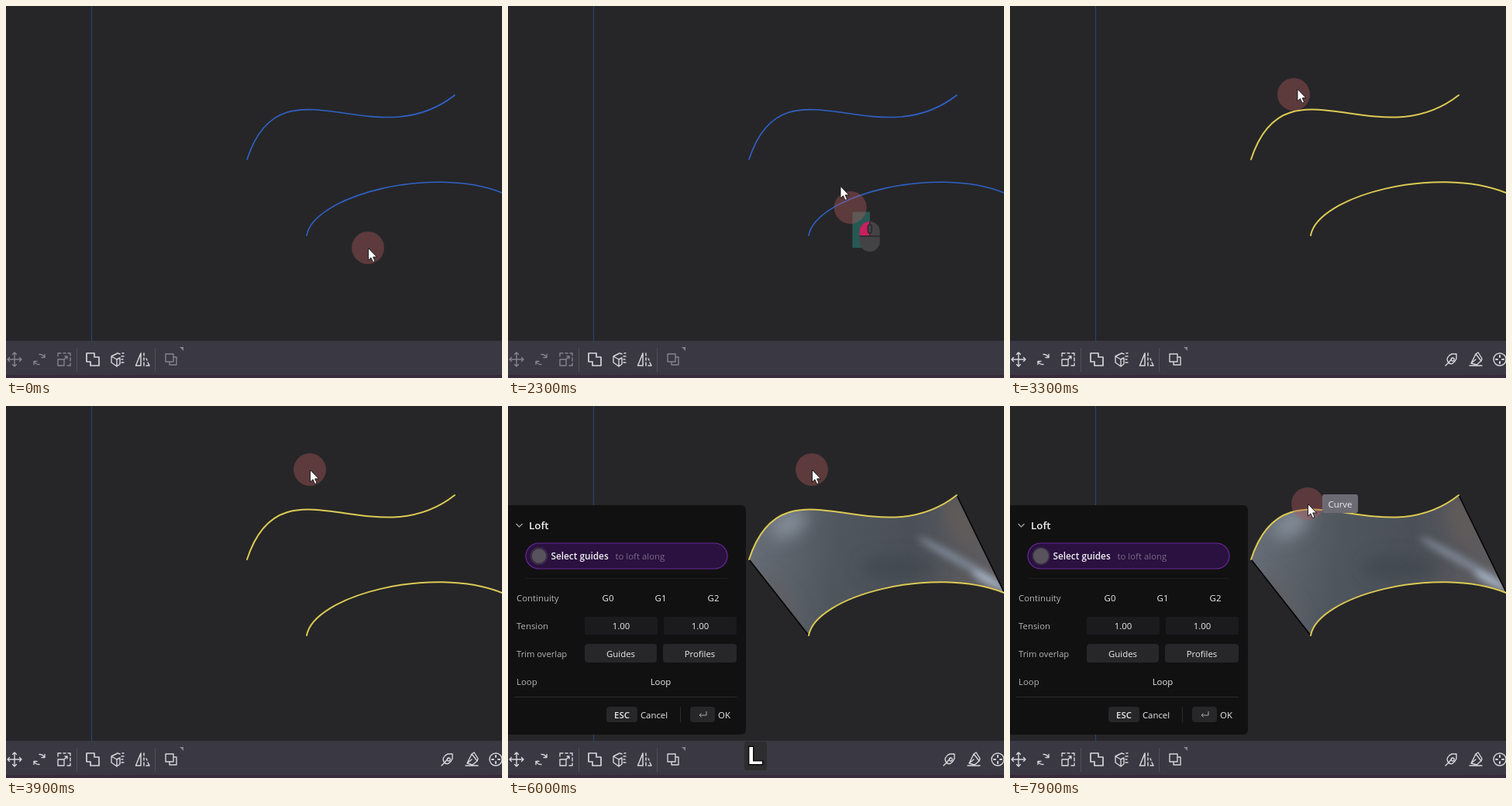
These frames come from a looping animation (640 px wide and 480 px high, 8000 ms). An HTML page:

```html
<!DOCTYPE html>
<html lang="en">
<head>
<meta charset="utf-8">
<title>Loft between two curves</title>
<style>
  html, body { margin: 0; width: 100%; height: 100%; overflow: hidden; background: #262628; }
  svg { display: block; }
  text { font: 11.4px "Open Sans", "Noto Sans", sans-serif; fill: #b4b4b6; }
  .mid text, text.mid { text-anchor: middle; fill: #ececee; }
  .strong { font-weight: 600; fill: #f0f0f2; }
  .key { font: bold 32px "Liberation Sans", Arial, sans-serif; fill: #fff;
         stroke: #0c0c0c; stroke-width: 3; paint-order: stroke; text-anchor: middle; }
  .icons { fill: none; stroke: #d6d5da; stroke-width: 1.4; stroke-linejoin: round; stroke-linecap: round; }
  .curve { fill: none; stroke-linecap: round; }
</style>
</head>
<body>
<svg width="640" height="480" viewBox="0 0 640 480">
  <defs>
    <clipPath id="patch">
      <path d="M311 198C355 62 475 197 579 115L640 241C550 205 397 245 388 296Z"/>
    </clipPath>
    <linearGradient id="base" gradientUnits="userSpaceOnUse" x1="320" y1="160" x2="620" y2="210">
      <stop offset="0" stop-color="#666d76"/>
      <stop offset=".35" stop-color="#50565e"/>
      <stop offset=".65" stop-color="#4b5058"/>
      <stop offset="1" stop-color="#5f5d60"/>
    </linearGradient>
    <filter id="soft" x="-100%" y="-100%" width="300%" height="300%"><feGaussianBlur stdDeviation="10"/></filter>
    <filter id="fine" x="-100%" y="-100%" width="300%" height="300%"><feGaussianBlur stdDeviation="5"/></filter>
  </defs>

  <path d="M110.5 0V432" stroke="#294375" stroke-width="1.2"/>
  <rect id="box" fill="#285853"/>

  <g id="surface">
    <g clip-path="url(#patch)">
      <rect x="300" y="100" width="340" height="200" fill="url(#base)"/>
      <g filter="url(#soft)">
        <ellipse cx="362" cy="152" rx="26" ry="16" fill="#828c97" transform="rotate(-35 362 152)"/>
        <ellipse cx="352" cy="248" rx="40" ry="9" fill="#5f5d60" transform="rotate(52 352 248)"/>
        <ellipse cx="505" cy="208" rx="50" ry="14" fill="#43484f"/>
        <ellipse cx="584" cy="150" rx="16" ry="34" fill="#625b5a" transform="rotate(-26 584 150)"/>
      </g>
      <g filter="url(#fine)">
        <ellipse cx="580" cy="198" rx="58" ry="5" fill="#7f8a98" transform="rotate(29 580 198)"/>
        <ellipse cx="622" cy="226" rx="26" ry="5" fill="#a9b5c8" transform="rotate(28 622 226)"/>
      </g>
    </g>
    <path d="M311 198L388 296M579 115L640 240" stroke="#060606" stroke-width="1.7"/>
  </g>
  <path id="upper" class="curve" d="M311 198C355 62 475 197 579 115"/>
  <path id="lower" class="curve" d="M388 296C397 245 550 205 640 241"/>

  <rect y="432" width="640" height="48" fill="#3a3842"/>
  <rect y="476" width="640" height="4" fill="#382b3b"/>
  <path d="M91.5 441V472M192.5 441V472" stroke="#514f59"/>
  <path d="M224 440h5v5z" fill="#85838b"/>
  <g class="icons">
    <g id="edit">
      <path d="M11 447V465M2 456H20M8.500 449.500L11 447L13.500 449.500M8.500 462.500L11 465L13.500 462.500M4.500 453.500L2 456L4.500 458.500M17.500 453.500L20 456L17.500 458.500"/>
      <path d="M36.500 459A7 7 0 0 0 43 462.500M36 462.500V458.500H40M49.500 453A7 7 0 0 0 43 449.500M50 449.500V453.500H46"/>
      <path d="M67 456V464H75V456ZM67 452V448H71M74 448H77M80 448H83V451M83 454V458M83 461V464H79M75 456L79 452M76 452H79V455"/>
      <path d="M206 449H216V459H206ZM211 459V463H220V453H216"/>
    </g>
    <path d="M104 448H114V453H120V464H109V459H104Z" stroke-width="1.7"/>
    <path d="M136 452L144 448L147 449M136 452V460L143 465V456ZM143 456L147 454V462L143 465M150 448H152M149 452H152M149 456H151M149 460H152"/>
    <path d="M174 448V464H167.500ZM178 448V451M178 454V457M178 460V464M181 455L182 457M183 460L185 464H181" stroke-width="1.5"/>
    <g id="extra">
      <path d="M562 464L566 460M566 460C562 456 565 451 570 449L576 449L576 455C574 460 569 464 566 460ZM566 460L571 454M571 454A2 2 0 1 0 571.500 454"/>
      <path d="M593 464H609M595 461L601 449L608 458L602 463L595 461L601 456M601 449L604 447L609 455L608 458"/>
      <circle cx="632" cy="456" r="8"/>
      <path d="M632 451V453M632 459V461M627 456H629M635 456H637" stroke-width="2"/>
    </g>
  </g>

  <g id="panel">
    <path d="M0 128H301A6 6 0 0 1 307 134V418A6 6 0 0 1 301 424H0Z" fill="#111112"/>
    <path d="M10.500 152L14.500 156L18.500 152" fill="none" stroke="#aaa" stroke-width="1.2"/>
    <text x="27" y="159" class="strong" style="font-size:13.400px">Loft</text>
    <rect x="23" y="177" width="260" height="33" rx="16.500" fill="#2a113f" stroke="#68289a" stroke-width="1.2"/>
    <circle cx="40" cy="193.500" r="11.500" fill="#3a2a49"/>
    <circle id="pulse" cx="40" cy="193.500" fill="#57525b"/>
    <text x="55.500" y="198" class="strong" style="font-size:11.800px">Select guides</text>
    <text x="138.500" y="198" style="fill:#7b6a87">to loft along</text>
    <path d="M23 222.500H283" stroke="#1d1d1f"/>
    <path d="M8 375.500H295M222.500 388V408" stroke="#2b2b2d"/>
    <text x="11" y="252">Continuity</text>
    <text x="11" y="288">Tension</text>
    <text x="11" y="324" style="font-size:11.200px">Trim overlap</text>
    <text x="11" y="360">Loop</text>
    <g fill="#1b1b1d">
      <rect x="99" y="272" width="94" height="23" rx="2"/>
      <rect x="201" y="272" width="94" height="23" rx="2"/>
    </g>
    <g fill="#272729">
      <rect x="99" y="307" width="93" height="24" rx="4"/>
      <rect x="200" y="307" width="95" height="24" rx="4"/>
      <rect x="127" y="388" width="40" height="20" rx="4"/>
      <rect x="235" y="388" width="32" height="20" rx="4"/>
    </g>
    <g class="mid" font-weight="500">
      <text x="129" y="252">G0</text><text x="197" y="252">G1</text><text x="265" y="252">G2</text>
      <text x="146" y="288">1.00</text><text x="248" y="288">1.00</text>
      <text x="145.500" y="324">Guides</text><text x="247.500" y="324">Profiles</text>
      <text x="197" y="360">Loop</text>
      <text x="147" y="403" class="strong">ESC</text>
      <text x="188.500" y="403">Cancel</text><text x="279" y="403">OK</text>
    </g>
    <path d="M256 394V399H247M249.500 396.500L247 399L249.500 401.500" fill="none" stroke="#aaa"/>
  </g>

  <g id="badge">
    <rect x="305" y="433" width="29" height="37" rx="3" fill="#2d2d2f"/>
    <text id="key" class="key" x="319" y="462"></text>
  </g>

  <g id="halo">
    <circle r="21" fill="#af585a" fill-opacity=".4"/>
    <g id="mouse" transform="translate(12 18)">
      <path d="M0 20V13A13 13 0 0 1 26 13V26A13 13 0 0 1 0 26Z" fill="#434345"/>
      <path d="M0 18.500V13A13 13 0 0 1 13 0V18.500Z" fill="#c7205f"/>
      <path d="M0 19H26M13 0V19" stroke="#29292b" stroke-width="1.3"/>
      <rect x="10.500" y="4" width="5" height="11" rx="2.500" fill="#434345" stroke="#232325" stroke-width="1.2"/>
    </g>
  </g>
  <path id="cursor" d="M0 0V15.500L3.500 12.300L6 18L8.600 17L6.200 11.400H11Z" fill="#fff" stroke="#111" stroke-width=".9"/>
  <g id="tip">
    <rect x="19" y="-12" width="46" height="24" rx="3" fill="#6c6b73"/>
    <text class="mid" x="42" y="5" font-weight="500">Curve</text>
  </g>
</svg>
<script>
const LOOP = 8000, STEP = 100;
const start = [467, 312];

// time, x, y of the pointer halo
const route = [
  [0, ...start], [1950, ...start], [2200, 455, 288], [2600, 402, 176], [2700, 385, 144],
  [2800, 369, 124], [2900, 366, 116], [3300, 366, 114], [3700, 384, 85], [3900, 392, 82],
  [7400, 392, 82], [7500, 391, 99], [7700, 387, 118], [7900, 384, 126], [9000, 384, 126]
];

const el = id => document.getElementById(id);
const show = (id, on) => el(id).style.display = on ? "" : "none";
const within = (t, a, b) => t >= a && t < b;
const place = (id, x, y) => el(id).setAttribute("transform", `translate(${x} ${y})`);

function attrs(id, values) {
  for (const name in values) el(id).setAttribute(name, values[name]);
}

function pointer(t) {
  const i = route.findIndex(p => p[0] > t);
  const [t0, x0, y0] = route[i - 1], [t1, x1, y1] = route[i];
  const k = (t - t0) / (t1 - t0);
  return [x0 + (x1 - x0) * k, y0 + (y1 - y0) * k];
}

function paint(id, selected, hovered) {
  attrs(id, {
    stroke: selected ? "#dcca55" : hovered ? "#dededc" : "#2f62c8",
    "stroke-width": selected || hovered ? 2 : 1.6
  });
}

function draw(t) {
  const [x, y] = pointer(t);
  const [cx, cy] = pointer(t + 100); // the arrow runs ahead of its halo
  const dragging = within(t, 2000, 3300), selected = t >= 3300, lofted = t >= 4700;

  place("halo", x, y);
  place("cursor", cx + .5, cy + .5);
  place("tip", x, y);
  show("tip", t >= 7800);
  show("mouse", within(t, 1800, 3300));

  const [bx, by] = pointer(Math.max(0, t - 20));
  show("box", dragging);
  attrs("box", { x: bx, y: by, width: start[0] - bx, height: start[1] - by });
  paint("lower", selected, dragging && by < 242);
  paint("upper", selected, dragging && by < 136);

  el("edit").style.stroke = selected ? "" : "#85838b";
  show("extra", selected);
  show("surface", lofted);
  show("panel", lofted);
  attrs("pulse", { r: 9 + Math.cos((t - 4800) / 1550 * 2 * Math.PI) });

  show("badge", within(t, 1100, 2300) || within(t, 4700, 7700));
  el("key").textContent = lofted ? "L" : "2";
}

function tick() {
  draw(Math.floor(performance.now() % LOOP / STEP) * STEP);
  requestAnimationFrame(tick);
}
tick();
</script>
</body>
</html>
```
